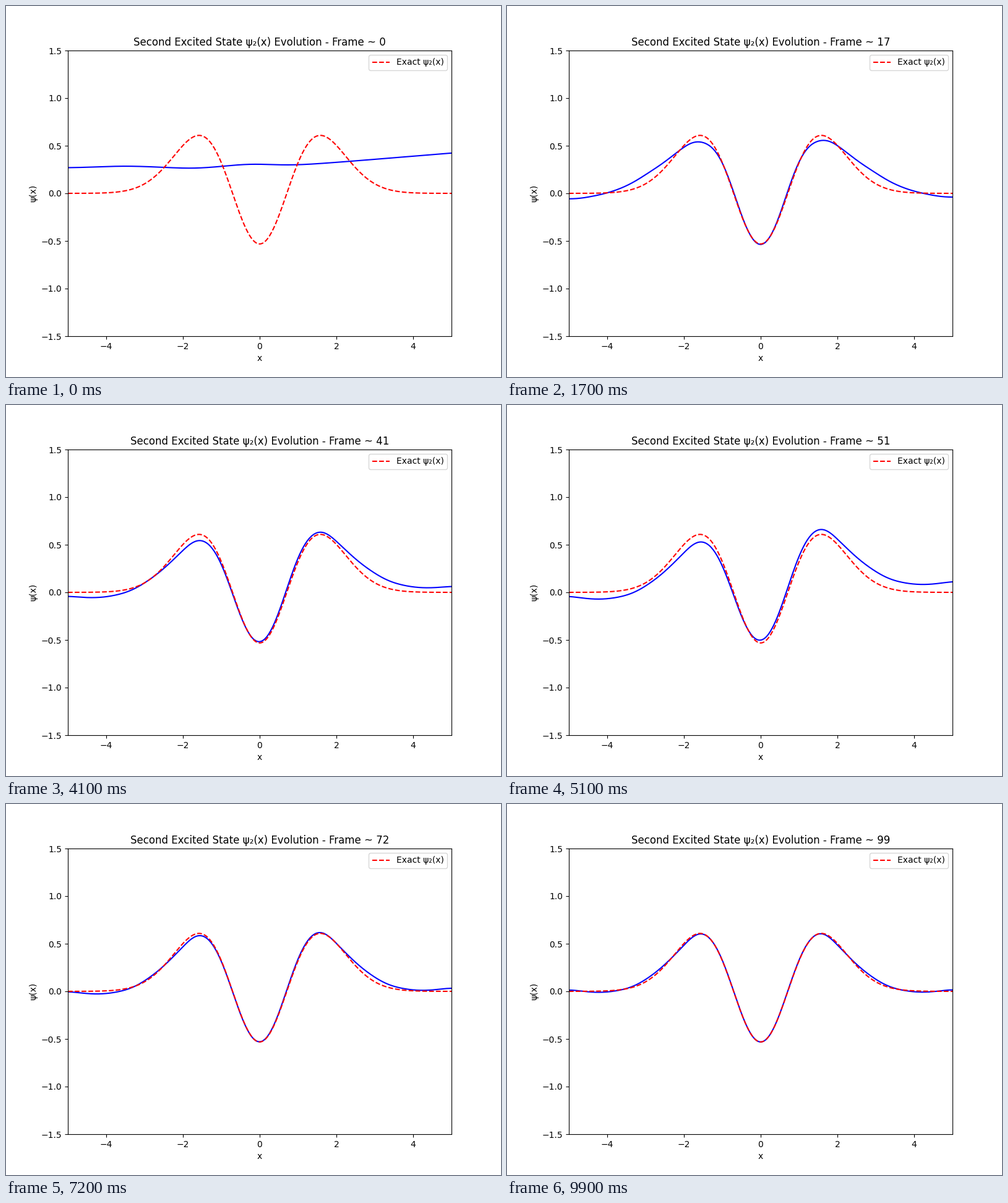
Write a matplotlib script that moves like this. It is 800 by 600 pixels and loops after 10000 ms.

```python
import numpy as np
import matplotlib.pyplot as plt
from matplotlib.animation import FuncAnimation

FRAMES = 100
SETTLED = 17  # step at which the three-lobed shape is learned
x = np.linspace(-5, 5, 400)
r = np.abs(x)


def hump(u, center, width):
    return np.exp(-((u - center) / width) ** 2)


exact = (2 * x**2 - 1) / np.sqrt(2) * np.pi**-0.25 * np.exp(-x**2 / 2)

# Untrained curve: flat, then rising, with gentle waves on the left
start = (0.268 + 0.022 * np.log1p(np.exp(1.5 * (x - 0.3)))
         + 0.029 * hump(x, -0.25, 0.85)
         - 0.006 * hump(x, -1.8, 0.6)
         + 0.017 * hump(x, -3.5, 1.0))

# Errors of the fit: broad shoulders that fade, and a ripple that stays
shoulders = (0.080 * hump(r, 3.0, 0.9) - 0.066 * hump(r, 1.5, 0.42)
             - 0.065 * hump(r, 5.0, 0.6) + 0.018 * hump(r, 0.75, 0.4))
ripple = (0.027 * hump(r, 2.85, 0.5) - 0.019 * hump(r, 2.0, 0.35)
          - 0.012 * hump(r, 4.15, 0.5) + 0.016 * hump(r, 5.0, 0.4)
          + 0.005 * hump(r, 0.9, 0.4))
skew = np.tanh(0.8 * x)
lift = hump(x, 0, 0.5) + (x / 5) ** 4


def tilt(i):
    """Left-right imbalance of the fit."""
    return np.interp(i, [17, 32, 51, 72, 89, 99],
                     [0.009, 0.029, 0.077, 0.019, -0.016, 0.001])


def fit(i):
    a = tilt(i)
    fade = np.exp(-max(i - SETTLED, 0) / 20)
    trained = exact + ripple + fade * shoulders + a * skew + 5 * a**2 * lift
    learned = 1 - np.exp(-(i / 4.5) ** 1.4)
    overshoot = 0.02 * hump(i, 14, 3) * hump(x, 0, 0.5)
    return start + learned * (trained - start) - overshoot


fig, ax = plt.subplots(figsize=(8, 6), dpi=100)
curve, = ax.plot(x, start, "b-")
ax.plot(x, exact, "r--", label="Exact ψ₂(x)")
ax.set(xlim=(-5, 5), ylim=(-1.5, 1.5), xlabel="x", ylabel="ψ(x)")
ax.legend(loc="upper right")
title = ax.set_title("")


def update(i):
    curve.set_ydata(fit(i))
    title.set_text(f"Second Excited State ψ₂(x) Evolution - Frame ~ {i}")
    return curve, title


anim = FuncAnimation(fig, update, frames=FRAMES, interval=100,
                     repeat=True, repeat_delay=0)
plt.show()
```
